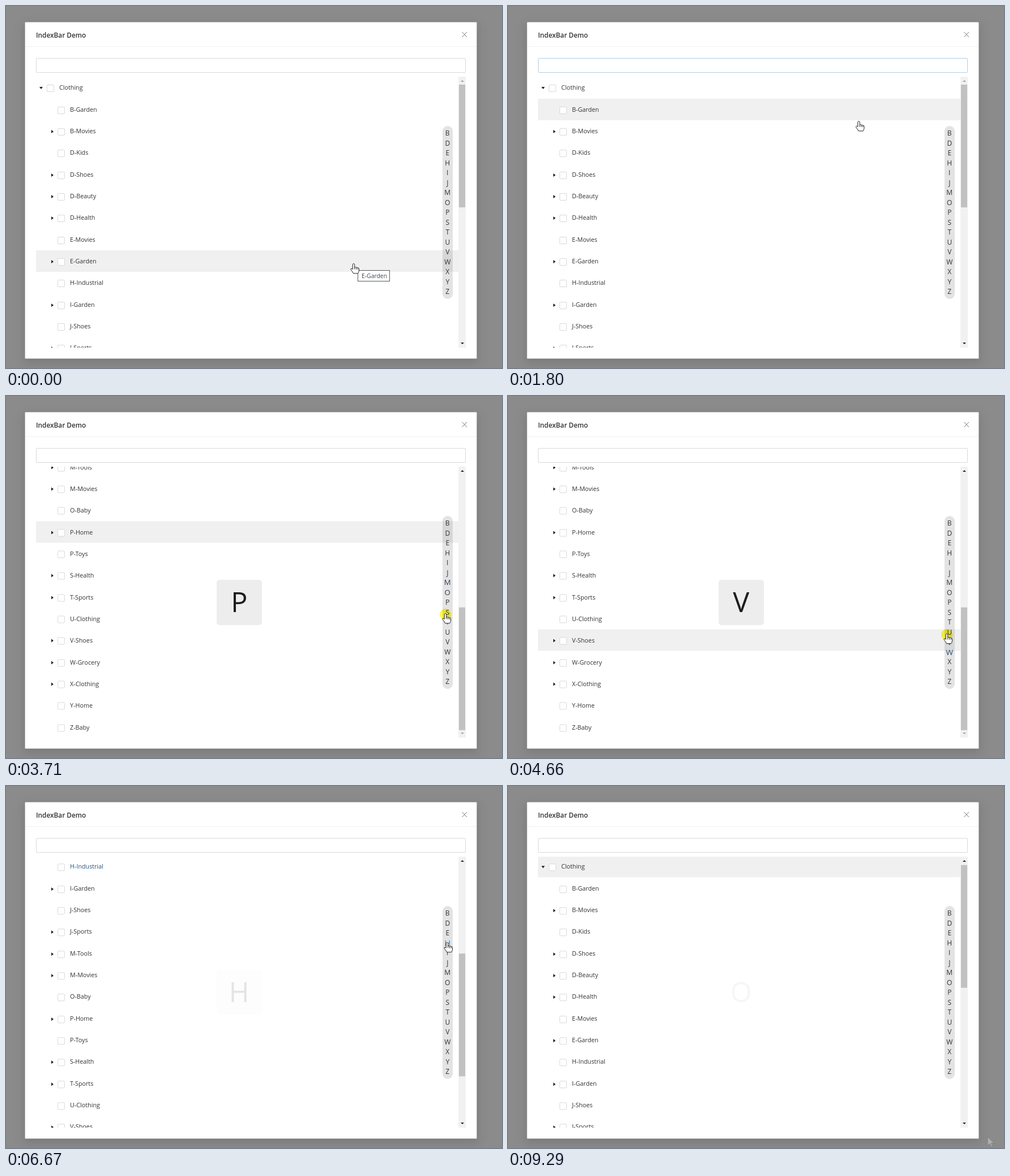
An HTML page for the animation above (9900 ms loop, 876 px wide and 640 px high).

```html
<!DOCTYPE html>
<html lang="en">
<head>
<meta charset="utf-8">
<title>IndexBar Demo</title>
<style>
html, body { margin: 0; width: 100%; height: 100%; overflow: hidden; background: #8b8b8b; }
#stage { position: relative; width: 876px; height: 640px; overflow: hidden; background: #8b8b8b;
  font: 10.75px/38px "Open Sans", "Noto Sans", sans-serif; color: #333; }
#stage div, #stage svg { position: absolute; box-sizing: border-box; }
#modal { left: 34px; top: 29px; width: 797px; height: 594px; background: #fff; border-radius: 1px;
  box-shadow: 0 0 0 1px rgba(255,255,255,.4), 0 2px 5px -3px rgba(0,0,0,.12),
    0 5px 13px rgba(0,0,0,.08), 0 7px 22px 6px rgba(0,0,0,.05); }
#head { left: 34px; top: 71px; width: 797px; height: 1px; background: #f0f0f0; }
#title { left: 53px; top: 31.5px; font-size: 11.8px; font-weight: 600; color: #333; white-space: nowrap; }
#field { left: 52.5px; top: 92px; width: 759.5px; height: 25.5px; border: 1px solid #d9d9d9; border-radius: 2px; }
#view { left: 53px; top: 125px; width: 759px; height: 479px; overflow: hidden; }
#rows { left: 0; top: .3px; width: 746px; }
.row { left: 0; width: 746px; height: 38px; }
.row div { white-space: nowrap; }
.box { top: 14px; width: 13px; height: 13px; border: 1px solid #d9d9d9; border-radius: 2px; background: #fff; }
.caret { border: 3px solid transparent; width: 0; height: 0; }
.right { left: 26.5px; top: 17px; border-left: 4px solid #222; border-right: 0; }
.down { left: 6px; top: 18px; border-top: 4px solid #222; border-bottom: 0; }
#track { left: 746px; top: 0; width: 13px; height: 479px; background: #f1f1f1; }
#thumb { left: 1px; top: 14px; width: 11px; height: 217px; background: #c1c1c1; }
#up, #down { left: 3.5px; }
#up { top: 5.5px; border-bottom: 3.5px solid; border-top: 0; }
#down { top: 470px; border-top: 3.5px solid; border-bottom: 0; }
#bar { left: 771px; top: 211.5px; width: 17.5px; height: 306px; border-radius: 9px; background: rgba(0,0,0,.11); }
#bar div { left: -4px; width: 25.5px; height: 18px; line-height: 18px; text-align: center; font-size: 12px; }
#toast { left: 372px; top: 325px; width: 79.5px; height: 79.5px; border-radius: 5px; background: rgba(0,0,0,.07);
  font-size: 48.5px; line-height: 77px; text-align: center; color: #1d1d1d; }
#tip { left: 621px; top: 467px; width: 56.5px; height: 20px; line-height: 18px; padding-left: 6px;
  border: 1px solid #575757; background: #fff; color: #3d4557; font-size: 10.4px; white-space: nowrap; }
#glow { width: 20px; height: 20px; border-radius: 50%; background: #fffa46; mix-blend-mode: multiply; }
#stage svg { left: 0; top: 0; overflow: visible; }
</style>
</head>
<body>
<div id="stage">
  <div id="modal"></div><div id="head"></div>
  <div id="title">IndexBar Demo</div>
  <svg width="876" height="640"><path d="M805.5 46l8.5 9M814 46l-8.5 9" stroke="#777" fill="none"/></svg>
  <div id="field"></div>
  <div id="view">
    <div id="rows"></div>
    <div id="track"><div id="thumb"></div><div id="up" class="caret"></div><div id="down" class="caret"></div></div>
  </div>
  <div id="bar"></div>
  <div id="toast"></div>
  <div id="tip">E-Garden</div>
  <div id="glow"></div>
  <svg id="pointer" width="20" height="24" stroke="#222" fill="#fff" stroke-linejoin="round">
    <path id="hand" d="M-1.7 1.5Q0-.8 1.7 1.5V7Q3 5.6 4.6 7.4Q6 6.3 7.3 8Q9.4 7.3 9.5 9.6V13Q9 15.5 7.7 17.8H-.5Q-1.5 15-4.6 11.6Q-5.8 9.6-4 9Q-2.8 8.9-1.7 10.5ZM1.7 7V10.5M4.6 7.6V10.8M7.3 8.4V11"/>
    <path id="beam" d="M-3-8.5H-1L0-7.5 1-8.5H3M0-7.5V7.5M-3 8.5H-1L0 7.5 1 8.5H3" fill="none"/>
    <path id="arrow" d="M0 0V16L3.8 12.5 6.3 18.3 8.8 17.2 6.3 11.5H11.3Z" stroke="#666"/>
  </svg>
</div>
<script>
const LOOP = 9900, PITCH = 38.333, MAX_SCROLL = 517.5, PAD = 1.7, LAG = 70;
const LETTERS = [..."BDEHIJMOPSTUVWXYZ"];
// A leading ">" marks a row that can be expanded.
const NAMES = ("Clothing,B-Garden,>B-Movies,D-Kids,>D-Shoes,>D-Beauty,>D-Health,E-Movies,>E-Garden,H-Industrial," +
  ">I-Garden,J-Shoes,>J-Sports,>M-Tools,>M-Movies,O-Baby,>P-Home,P-Toys,>S-Health,>T-Sports,U-Clothing," +
  ">V-Shoes,>W-Grocery,>X-Clothing,Y-Home,Z-Baby").split(",");
const FIRST = LETTERS.map(c => NAMES.findIndex(n => n.replace(">", "").startsWith(c + "-")));

// time, x, y of the pointer's hot spot
const PATH = [
  [500, 614, 455], [760, 640, 320], [1040, 622, 146], [1180, 622, 146], [1360, 625, 104], [1560, 625, 104],
  [1800, 619, 203], [1960, 700, 230], [2140, 779, 221], [2410, 781, 222], [2760, 781, 222], [2950, 775, 279],
  [3170, 775, 280], [3300, 775, 281], [3710, 776, 384], [3800, 776, 388], [4300, 776, 452], [4400, 776, 452],
  [4590, 775, 437], [4660, 775, 420], [5100, 776, 390], [5570, 778, 364], [5950, 779, 276], [6800, 779, 276],
  [7300, 778, 345], [8300, 778, 345], [8810, 847, 620]
];
const DRAG = [3030, 6050], CLICK = [7500, 7740];

const $ = id => document.getElementById(id);
const clamp = v => Math.max(0, Math.min(1, v));
const within = (v, [a, b]) => v >= a && v < b;

function add(parent, cls, text = "") {
  const el = document.createElement("div");
  el.className = cls;
  el.textContent = text;
  parent.append(el);
  return el;
}

const rows = NAMES.map((name, i) => {
  const row = add($("rows"), "row");
  row.style.top = i * PITCH + "px";
  if (!i) add(row, "caret down");
  if (name[0] === ">") add(row, "caret right");
  add(row, "box").style.left = (i ? 38 : 19) + "px";
  const label = add(row, "", name.replace(">", ""));
  label.style.left = (i ? 60 : 41) + "px";
  return { row, label };
});
const keys = LETTERS.map((c, i) => {
  const key = add($("bar"), "", c);
  key.style.top = 4.5 + i * 17.53 + "px";
  return key;
});

function pointer(t) {
  const n = PATH.findIndex(p => p[0] > t);
  if (n < 1) return (n ? PATH.at(-1) : PATH[0]).slice(1);
  const [t0, x0, y0] = PATH[n - 1], [t1, x1, y1] = PATH[n];
  const k = (t - t0) / (t1 - t0);
  return [x0 + (x1 - x0) * k, y0 + (y1 - y0) * k];
}

function keyAt(t) {
  const [x, y] = pointer(t);
  return within(x, [771, 788.5]) && within(y, [216, 514]) ? Math.floor((y - 216.2) / 17.53) : -1;
}

const overField = t => within(pointer(t)[1], [92, 117.5]);

// Share of the last 200 ms during which a state held, used as a fade.
const recent = (test, t) => [0, 1, 2, 3, 4, 5, 6, 7].filter(k => test(t - LAG - k * 25)).length / 8;

function selection(t) {
  if (t < DRAG[0]) return { row: -1, scroll: 0, letter: "" };
  if (t >= CLICK[0]) return { row: 0, scroll: PAD, letter: "O" };
  const key = keyAt(Math.max(DRAG[0], Math.min(t, DRAG[1]) - LAG));
  const row = FIRST[key];
  return { row: t < DRAG[1] ? row : -1, scroll: Math.min(MAX_SCROLL, row * PITCH + PAD), letter: LETTERS[key] };
}

function toastOpacity(t) {
  const [on, off] = t < CLICK[0] ? DRAG : CLICK;
  if (t < off) return clamp((t - on) / 250);
  return Math.max(t > CLICK[1] ? .035 : 0, clamp(1 - (t - off) / 700));
}

function mix(from, to, k) {
  return `rgb(${from.map((v, i) => Math.round(v + (to[i] - v) * k))})`;
}
const INK = [51, 51, 51], BLUE = [24, 144, 255], LINE = [217, 217, 217];

function draw(t) {
  const { row, scroll, letter } = selection(t);
  const [x, y] = pointer(t), [hx, hy] = pointer(t - LAG);
  const pressed = within(t, DRAG) || within(t, CLICK);
  const inTree = within(hx, [53, 799]) && within(hy, [125, 604]);
  const hover = inTree && keyAt(t - LAG) < 0 ? Math.floor((hy - 125.3 + scroll) / PITCH) : -1;

  rows.forEach((r, i) => {
    r.row.style.background = i === row || i === hover ? "#f0f0f0" : "none";
    const tint = i === 9 && t > DRAG[1] && t < CLICK[0] ? .8 * clamp((7000 - t) / 730) : 0;
    r.label.style.color = mix(INK, BLUE, tint);
  });
  keys.forEach((key, i) => {
    const k = recent(s => keyAt(s) === i, t);
    key.style.color = mix(INK, BLUE, k * k);
    key.style.transform = `scale(${1 + .25 * k})`;
  });

  $("rows").style.transform = `translateY(${-scroll}px)`;
  $("thumb").style.transform = `translateY(${scroll * .4536}px)`;
  $("up").style.borderBottomColor = scroll > 0 ? "#222" : "#a3a3a3";
  $("down").style.borderTopColor = scroll < MAX_SCROLL ? "#222" : "#a3a3a3";
  $("field").style.borderColor = mix(LINE, [64, 169, 255], recent(overField, t));
  $("toast").textContent = letter;
  $("toast").style.opacity = toastOpacity(t);
  $("tip").style.visibility = t < 500 ? "visible" : "hidden";
  $("glow").style.visibility = pressed ? "visible" : "hidden";
  $("glow").style.transform = `translate(${x - 10}px, ${y - 8}px)`;

  const shape = overField(t) ? "beam" : within(x, [53, 799]) && within(y, [125, 604]) ? "hand" : "arrow";
  for (const id of ["hand", "beam", "arrow"]) $(id).style.display = id === shape ? "" : "none";
  $("pointer").style.transform = `translate(${x}px, ${y}px)`;
  $("pointer").style.opacity = t > 8880 ? .3 : 1;
}

function frame() {
  draw(performance.now() % LOOP);
  requestAnimationFrame(frame);
}
frame();
</script>
</body>
</html>
```
